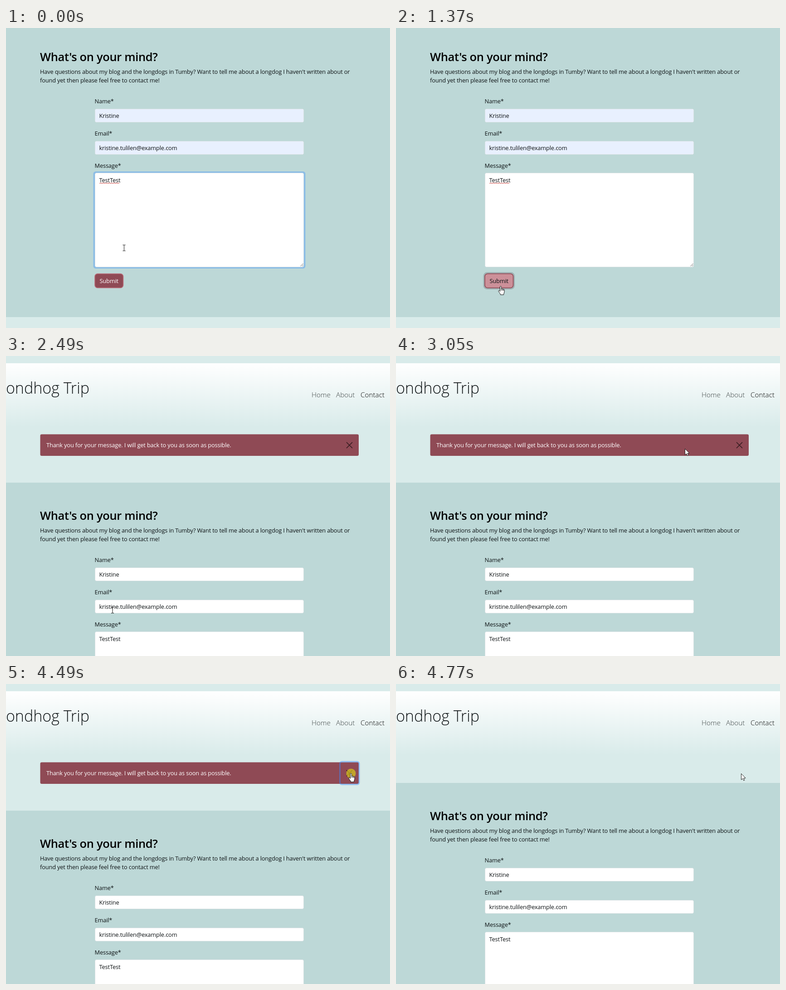
Animation of 847x661 px, one loop 5030 ms. Source, as an HTML page:

```html
<!DOCTYPE html>
<html lang="en">
<head>
<meta charset="utf-8">
<title>Contact form</title>
<style>
  html, body { margin: 0; width: 100%; height: 100%; overflow: hidden; background: #d9ebea; }
  svg { display: block; width: 847px; height: 661px; }
  text { font: 12.8px "Open Sans", "Noto Sans", sans-serif; letter-spacing: -.15px; fill: #0d1214; white-space: pre; }
  .h2 { font-size: 25.4px; font-weight: 600; letter-spacing: -.3px; fill: #000; }
  .title { font-size: 34px; font-weight: 300; letter-spacing: 0; }
  .nav text { font-size: 15.3px; font-weight: 300; letter-spacing: 0; fill: #000; }
  .nav .dim { fill: #3d4444; }
  .light { fill: #fff; }
  .box { fill: #fff; stroke: #dbe3e5; }

  /* One 5030 ms loop, every change is a hard cut */
  .a { animation: 5030ms step-end infinite; }
  #page { animation-name: scroll; }
  #before { animation-name: before; }
  #header { animation-name: header; }
  #focus { animation-name: blur; }
  #caret { animation-name: caret; }
  #hover { animation-name: hover; }
  #ring { animation-name: ring; }
  #alert { animation-name: fade; }
  #cross { animation-name: cross; }
  #closeRing { animation-name: closeRing; }
  #click { animation-name: click; }
  #cursor { animation-name: move; }
  #arrow { animation-name: arrow; }
  #beam { animation-name: beam; }
  #hand { animation-name: hand; }

  @keyframes scroll {
    0% { transform: none; }
    32.4% { transform: translateY(288px); }
    94.83%, 100% { transform: translateY(227px); }
  }
  @keyframes before { 0% { opacity: 1; } 32.4%, 100% { opacity: 0; } }
  @keyframes header { 0% { opacity: 0; } 32.4%, 100% { opacity: 1; } }
  @keyframes blur {
    0% { opacity: 1; } 23.06% { opacity: .85; } 24.45% { opacity: .45; }
    25.84% { opacity: .1; } 27.23%, 100% { opacity: 0; }
  }
  @keyframes caret { 0% { opacity: 0; } 9.54% { opacity: 1; } 19.08%, 100% { opacity: 0; } }
  @keyframes hover {
    0% { opacity: 0; } 12.32% { opacity: .15; } 13.71% { opacity: .6; } 15.1%, 100% { opacity: 1; }
  }
  @keyframes ring {
    0% { opacity: 0; } 23.06% { opacity: .15; } 24.45% { opacity: .55; } 25.84%, 100% { opacity: 1; }
  }
  @keyframes fade {
    0% { opacity: 0; } 32.4% { opacity: 1; } 92.04% { opacity: .7; }
    93.43% { opacity: .23; } 94.83%, 100% { opacity: 0; }
  }
  @keyframes cross { 0% { opacity: .62; } 64.81%, 100% { opacity: .75; } }
  @keyframes closeRing { 0% { opacity: 0; } 89.26%, 100% { opacity: 1; } }
  @keyframes click {
    0% { opacity: 0; } 23.06% { opacity: .75; } 25.84% { opacity: 0; }
    89.26% { opacity: .75; } 92.04%, 100% { opacity: 0; }
  }
  @keyframes move {
    0% { transform: translate(260.5px, 484.5px); }
    6.75% { transform: translate(260px, 488px); }
    8.15% { transform: translate(258px, 498px); }
    9.54% { transform: translate(254px, 514px); }
    10.93% { transform: translate(247px, 533px); }
    12.32% { transform: translate(239px, 550px); }
    13.71% { transform: translate(234px, 563px); }
    15.1% { transform: translate(231px, 569px); }
    49.5% { transform: translate(235px, 560px); }
    50.89% { transform: translate(244px, 540px); }
    52.28% { transform: translate(255px, 510px); }
    53.67% { transform: translate(298px, 455px); }
    55.06% { transform: translate(341px, 395px); }
    56.46% { transform: translate(420px, 335px); }
    57.85% { transform: translate(500px, 283px); }
    59.24% { transform: translate(569px, 238px); }
    60.63% { transform: translate(637px, 204px); }
    62.02% { transform: translate(686px, 184px); }
    63.41% { transform: translate(716px, 175px); }
    64.81% { transform: translate(740px, 178px); }
    66.4% { transform: translate(753px, 185px); }
    67.79% { transform: translate(761px, 191px); }
    69.38% { transform: translate(765px, 194px); }
    70.77% { transform: translate(766px, 195px); }
    73.35% { transform: translate(763px, 196px); }
    74.75%, 100% { transform: translate(761px, 197px); }
  }
  @keyframes beam {
    0% { opacity: 1; } 10.93% { opacity: 0; } 49.5% { opacity: 1; } 52.28% { opacity: 0; }
    55.06% { opacity: 1; } 56.46%, 100% { opacity: 0; }
  }
  @keyframes arrow {
    0% { opacity: 0; } 10.93% { opacity: 1; } 12.32% { opacity: 0; } 52.28% { opacity: 1; }
    55.06% { opacity: 0; } 56.46% { opacity: 1; } 64.81% { opacity: 0; } 94.83%, 100% { opacity: 1; }
  }
  @keyframes hand {
    0% { opacity: 0; } 12.32% { opacity: 1; } 49.5% { opacity: 0; }
    64.81% { opacity: 1; } 94.83%, 100% { opacity: 0; }
  }
</style>
</head>
<body>
<svg viewBox="0 0 847 661">
  <defs>
    <linearGradient id="sky" x2="0" y2="1">
      <stop stop-color="#fff"/><stop offset="1" stop-color="#d9ebea"/>
    </linearGradient>
  </defs>
  <rect width="847" height="661" fill="#d9ebea"/>

  <g id="header" class="a">
    <rect y="16" width="847" height="140" fill="url(#sky)"/>
    <text class="title" x="184" y="82.5" text-anchor="end">Pondhog Trip</text>
    <g class="nav">
      <text class="dim" x="674" y="90.5">Home</text>
      <text class="dim" x="728" y="90.5">About</text>
      <text x="782" y="90.5">Contact</text>
    </g>
  </g>

  <g id="page" class="a">
    <rect y="-9" width="847" height="646" fill="#bdd8d7"/>
    <text class="h2" x="75" y="73">What's on your mind?</text>
    <text x="75" y="100.5">Have questions about my blog and the longdogs in Tumby? Want to tell me about a longdog I haven't written about or</text>
    <text x="75" y="120">found yet then please feel free to contact me!</text>

    <text x="195.5" y="166">Name*</text>
    <text x="195.5" y="236.5">Email*</text>
    <text x="195.5" y="307.5">Message*</text>
    <rect class="box" x="196.5" y="178.5" width="460" height="29" rx="3"/>
    <rect class="box" x="196.5" y="249.5" width="460" height="29" rx="3"/>
    <g id="focus" class="a">
      <rect x="192.5" y="316" width="468" height="214" rx="5.5" fill="#8cbde6"/>
    </g>
    <rect class="box" x="196.5" y="319.5" width="460" height="207" rx="3"/>
    <path d="M649.5 525l6-6M653 525l2.5-2.5" stroke="#555" stroke-width=".9"/>
    <g id="before" class="a">
      <rect x="197" y="179" width="459" height="28" rx="2.5" fill="#e8f0fe"/>
      <rect x="197" y="250" width="459" height="28" rx="2.5" fill="#e8f0fe"/>
      <path id="squiggle" fill="none" stroke="#c8403a"/>
    </g>
    <text x="205.5" y="198">Kristine</text>
    <text x="205.5" y="268.5">kristine.tulilen@example.com</text>
    <text x="205.5" y="339.5">TestTest</text>
    <rect id="caret" class="a" x="250" y="325" width="1" height="17"/>

    <g id="ring" class="a">
      <rect x="192.5" y="538" width="69.5" height="38" rx="8.5" fill="#9fb1b3"/>
    </g>
    <rect x="196" y="541.5" width="62.5" height="31" rx="6" fill="#8f4a55" stroke="#b96b78" stroke-width="1.6"/>
    <text class="light" x="227.2" y="561.7" text-anchor="middle">Submit</text>
    <g id="hover" class="a">
      <rect x="196" y="541.5" width="62.5" height="31" rx="6" fill="#cc9099" stroke="#8f4a55" stroke-width="1.6"/>
      <text x="227.2" y="561.7" text-anchor="middle">Submit</text>
    </g>
  </g>

  <g id="alert" class="a">
    <rect x="75.5" y="172.5" width="702.5" height="47.5" rx="3.3" fill="#8f4a55"/>
    <text class="light" x="89" y="201">Thank you for your message. I will get back to you as soon as possible.</text>
    <path id="cross" class="a" d="M751.5 190.5l12 12m0-12l-12 12" stroke="#000" stroke-width="1.7" stroke-linecap="round"/>
    <g id="closeRing" class="a">
      <rect x="736.5" y="171.3" width="42.5" height="50" rx="4.5" fill="none" stroke="#3d8bfd" stroke-opacity=".45" stroke-width="3"/>
    </g>
  </g>

  <g id="cursor" class="a">
    <circle id="click" class="a" r="10.5" fill="#d2c21e"/>
    <path id="beam" class="a" d="M-3-6.5h2.2l.8.7.8-.7H3M0-6V6M-3 6.5h2.2l.8-.7.8.7H3" fill="none" stroke="#111"/>
    <path id="arrow" class="a" d="M.5.5v13.5l3.200-2.900 2.100 4.700 2.200-1-2.100-4.500h4.200z" fill="#fff" stroke="#111" stroke-width=".9"/>
    <path id="hand" class="a" d="M-1.500 1.200C-1.500-.6 1.300-.6 1.300 1.200V6.200C1.600 5.100 3.800 5.300 3.900 6.700 4.400 5.700 6.100 6.100 6.100 7.400 6.700 6.600 8 7.100 8 8.300V12.500C8 14.500 6.600 15.500 6.600 17.200V18.800H-.8V17.300C-1.600 15.500-4.200 12.700-5 10.900-5.600 9.300-3.600 8.600-2.600 9.900L-1.500 11.300ZM1.300 6.200V9.500M3.900 6.700V9.700M6.100 7.400V9.900" fill="#fff" stroke="#111"/>
  </g>
</svg>
<script>
  let wave = "M206 343";
  for (let i = 1; i <= 22; i++) wave += `L${206 + 2 * i} ${i % 2 ? 341 : 343}`;
  document.getElementById("squiggle").setAttribute("d", wave);
</script>
</body>
</html>
```
